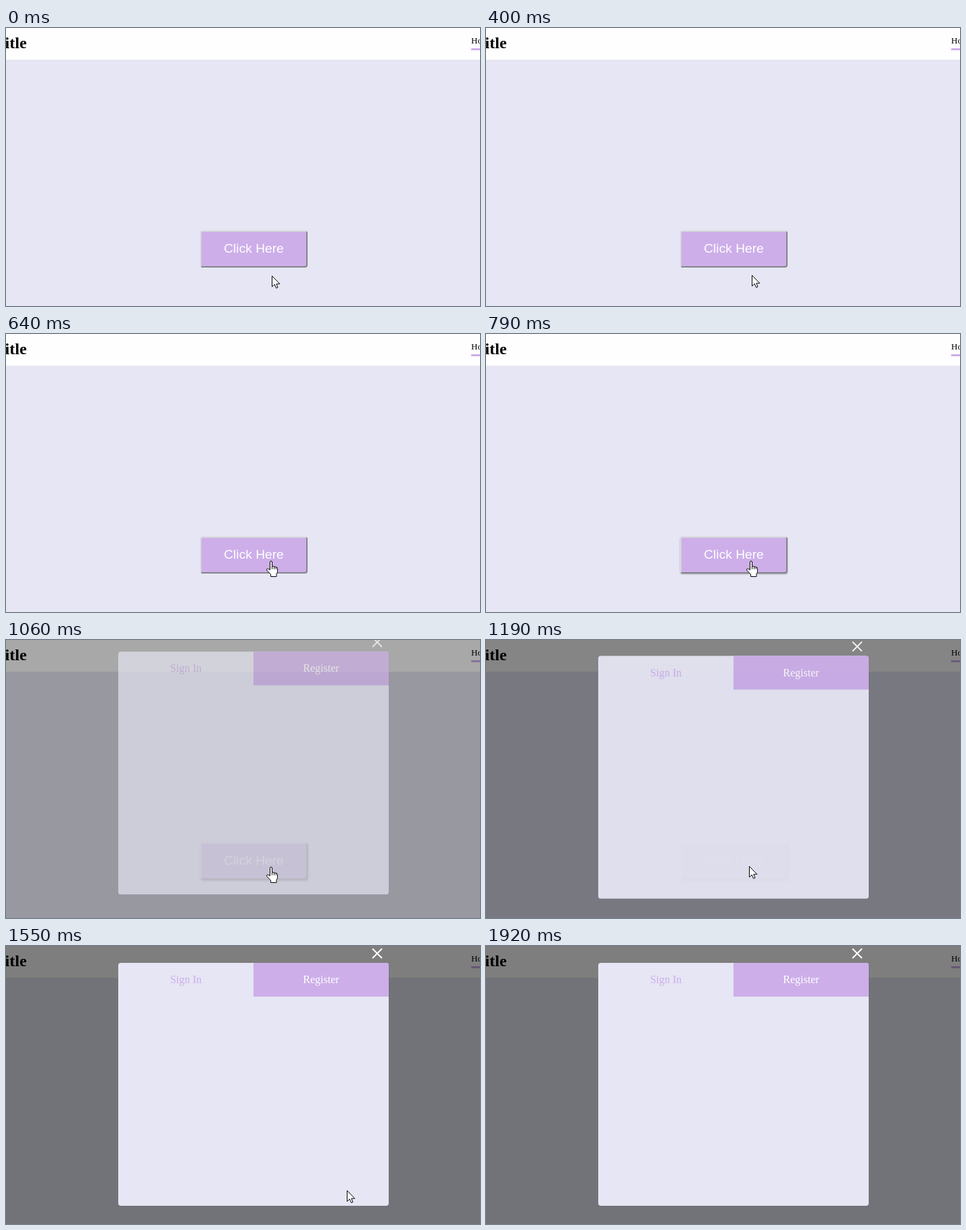
An HTML page that plays this animation: 701x412 px, repeating every 2200 ms.

```html
<!DOCTYPE html>
<html lang="en">
<head>
<meta charset="utf-8">
<title>Modal demo</title>
<style>
  :root { --lilac: #cdaee9; --pale: #e6e6f4; --serif: "Liberation Serif", serif; }
  html, body { margin: 0; width: 100%; height: 100%; overflow: hidden; background: var(--pale); }
  .stage { position: relative; width: 701px; height: 412px; overflow: hidden; background: var(--pale); font-family: var(--serif); }
  .stage * { box-sizing: border-box; }
  .abs, .stage > * { position: absolute; }

  header { left: 0; top: 0; width: 100%; height: 47px; background: #fefefe; color: #000; white-space: nowrap; }
  .title { left: -17px; top: 8px; font: bold 24px/28px var(--serif); }
  .nav { left: 688px; top: 11px; height: 22px; font-size: 13px; line-height: 16px; border-bottom: 3px solid var(--lilac); }

  .button {
    left: 287px; top: 300px; width: 159px; height: 55px;
    border: 2px solid; border-color: #d8d8dc #858589 #858589 #d8d8dc; border-radius: 4px;
    background: var(--lilac); color: #fff; text-align: center;
    font: 19.2px/50px "Liberation Sans", sans-serif;
  }
  .shade { inset: 0; background: rgba(0, 0, 0, .5); }

  .modal { left: 166px; top: 25px; width: 400px; height: 360px; border-radius: 4px; background: var(--pale); }
  .tab { top: 0; width: 200px; height: 50px; text-align: center; font-size: 16px; line-height: 50px; }
  .signin { left: 0; color: var(--lilac); }
  .register { left: 200px; background: var(--lilac); color: #fff; border-radius: 0 4px 0 0; }
  .close { left: 375px; top: -22px; stroke: #fff; stroke-width: 2; }

  .cursor { left: 0; top: 0; overflow: visible; fill: #fff; stroke: #000; stroke-linejoin: round; }
  .hand { left: 385px; top: 336px; }

  /* The screen refreshes in discrete steps, so every pose is held. */
  .button, .shade, .modal, .cursor { animation: 2.2s step-end infinite; }
  .button { animation-name: hover; }
  .shade { animation-name: dim; }
  .modal { animation-name: drop; }
  .arrow { animation-name: point; }
  .hand { animation-name: grab; }

  @keyframes hover {
    0% { box-shadow: none; }
    35.9% { box-shadow: 0 1px 2px rgba(0, 0, 0, .3); }
    42.72% { box-shadow: 1px 2px 3px rgba(0, 0, 0, .4); }
  }
  @keyframes dim {
    0% { opacity: 0; }
    42.72% { opacity: .22; }
    48.18% { opacity: .68; }
    54.09% { opacity: .95; }
    59.54%, 100% { opacity: 1; }
  }
  @keyframes drop {
    0% { opacity: 0; transform: translateY(-25px); }
    42.72% { opacity: .2; transform: translateY(-19px); }
    48.18% { opacity: .68; transform: translateY(-7.7px); }
    54.09% { opacity: .945; transform: translateY(-1.4px); }
    59.54%, 100% { opacity: 1; transform: none; }
  }
  @keyframes point {
    0% { opacity: 1; transform: translate(393px, 367px); }
    18.18% { opacity: 1; transform: translate(393px, 366px); }
    23.63% { opacity: 1; transform: translate(392px, 357px); }
    29.09% { opacity: 0; transform: translate(391px, 337px); }
    54.09% { opacity: 1; transform: translate(389px, 335px); }
    59.54% { opacity: 1; transform: translate(412px, 338px); }
    65% { opacity: 1; transform: translate(460px, 347px); }
    70.45% { opacity: 1; transform: translate(504px, 362px); }
    75.9% { opacity: 1; transform: translate(552px, 380px); }
    81.81% { opacity: 1; transform: translate(596px, 398px); }
    87.27%, 100% { opacity: 0; transform: translate(640px, 416px); }
  }
  @keyframes grab {
    0% { opacity: 0; }
    29.09% { opacity: 1; }
    54.09%, 100% { opacity: 0; }
  }
</style>
</head>
<body>
<div class="stage">
  <header>
    <div class="abs title">Title</div>
    <div class="abs nav">Home</div>
  </header>
  <div class="button">Click Here</div>
  <div class="shade"></div>
  <div class="modal">
    <div class="abs tab signin">Sign In</div>
    <div class="abs tab register">Register</div>
    <svg class="abs close" width="16" height="16"><path d="M1 1L15 15M15 1L1 15"/></svg>
  </div>
  <svg class="cursor arrow" width="13" height="20">
    <path d="M.5 .5V16.5L4.2 13L6.6 18.5L9 17.5L6.8 12.2H11.8Z"/>
  </svg>
  <svg class="cursor hand" width="18" height="24">
    <path d="M5.5 13.5V2a1.5 1.5 0 0 1 3 0V8.5q1.5-1 3 .5q1.7-.7 2.7 .7q2.3-.4 2.3 2v4q0 2-1.5 4v3.8h-8.5v-3.3L1 14.5q-1-1.7 .3-2.5q1.2-.6 2.5 .7z"/>
    <path d="M8.5 8.5v4M11.5 9v3.5M14.2 9.7v3" fill="none"/>
  </svg>
</div>
</body>
</html>
```
